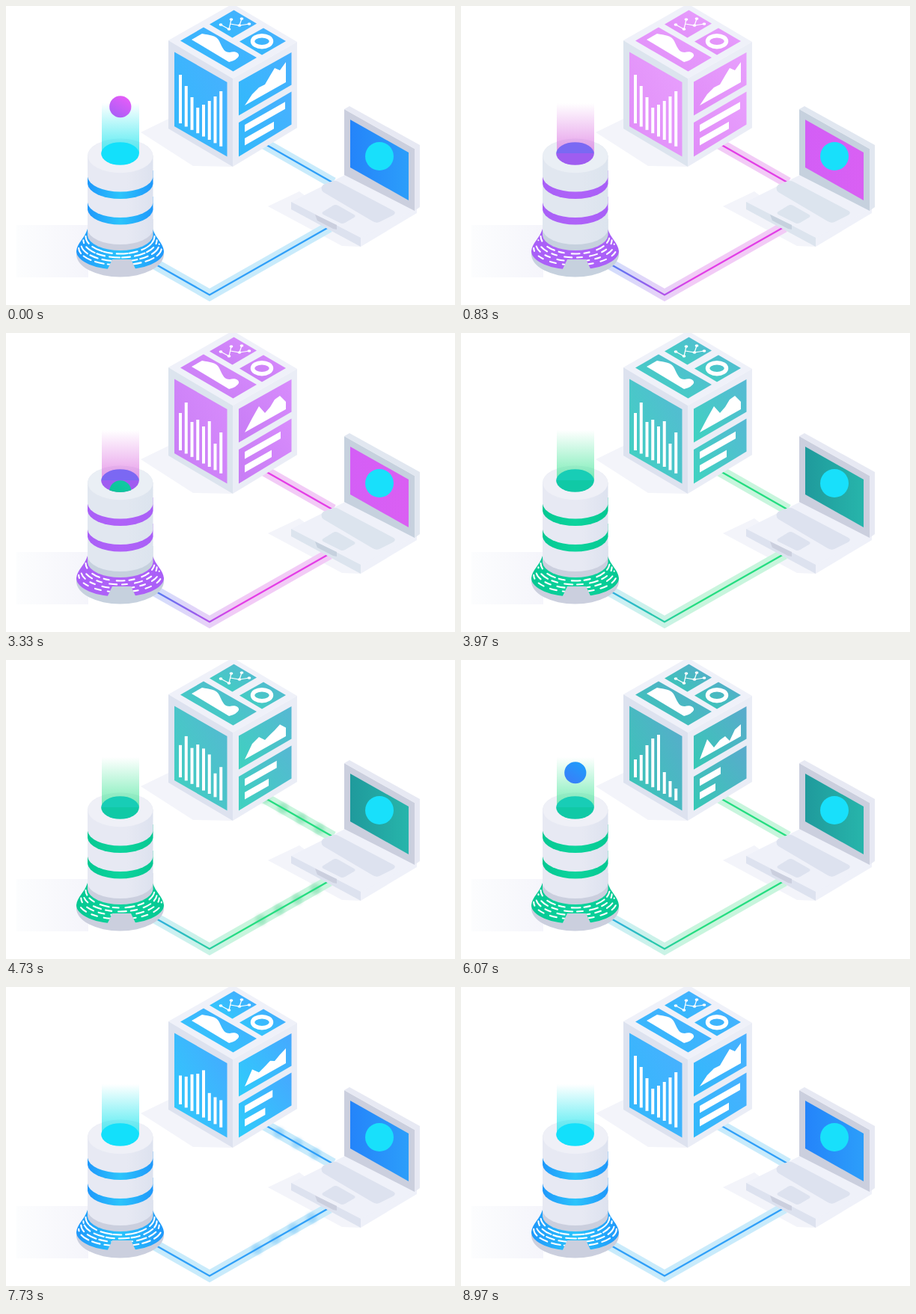
Animation, 600 px wide and 400 px high, one loop 9.01 s. Source, as an HTML page:

```html
<!DOCTYPE html>
<html lang="en">
<head>
<meta charset="utf-8">
<title>Data flow</title>
<style>
html, body { margin: 0; width: 100%; height: 100%; overflow: hidden; background: #fff; }
svg { display: block; width: 600px; height: 400px; }
.white { fill: #fff; }
.pale { fill: #eff1f9; }
.light { fill: var(--light); }
.mid { fill: var(--mid); }
.dark { fill: var(--dark); }
.panel { fill: url(#panel); }
.line { fill: none; stroke: #fff; }
.band { fill: none; stroke: url(#bandFill); stroke-width: 15; }
.wire { fill: none; stroke: url(#wireFill); stroke-width: 2.3; }
</style>
</head>
<body>
<svg id="stage" viewBox="0 0 600 400">
  <defs>
    <linearGradient id="panel" x1="0" y1="1" x2="1" y2="0">
      <stop offset="0" stop-color="var(--cube0)"/><stop offset="1" stop-color="var(--cube1)"/>
    </linearGradient>
    <linearGradient id="screen">
      <stop offset="0" stop-color="var(--screen0)"/><stop offset="1" stop-color="var(--screen1)"/>
    </linearGradient>
    <linearGradient id="ring">
      <stop offset="0" stop-color="var(--ring0)"/><stop offset=".5" stop-color="var(--ring1)"/><stop offset="1" stop-color="var(--ring0)"/>
    </linearGradient>
    <linearGradient id="beam" x1="0" y1="0" x2="0" y2="1">
      <stop offset="0" stop-color="var(--beam)" stop-opacity="0"/><stop offset="1" stop-color="var(--beam)" stop-opacity=".8"/>
    </linearGradient>
    <linearGradient id="hole" x1="0" y1="0" x2="0" y2="1">
      <stop offset=".48" stop-color="var(--hole0)"/><stop offset=".48" stop-color="var(--hole1)"/>
    </linearGradient>
    <linearGradient id="ballFill" x1=".2" y1="1" x2=".8" y2="0">
      <stop offset="0" stop-color="var(--ball0)"/><stop offset="1" stop-color="var(--ball1)"/>
    </linearGradient>
    <linearGradient id="body">
      <stop offset="0" stop-color="var(--light)"/><stop offset=".6" stop-color="var(--light)"/><stop offset="1" stop-color="var(--mid)"/>
    </linearGradient>
    <linearGradient id="wireFill" gradientUnits="userSpaceOnUse" x1="205" x2="310" y1="0" y2="0">
      <stop offset="0" stop-color="var(--wire0)"/><stop offset="1" stop-color="var(--wire1)"/>
    </linearGradient>
    <linearGradient id="bandFill" gradientUnits="userSpaceOnUse" x1="205" x2="310" y1="0" y2="0">
      <stop offset="0" stop-color="var(--band0)"/><stop offset="1" stop-color="var(--band1)"/>
    </linearGradient>
    <linearGradient id="shade">
      <stop offset="0" stop-color="#fcfdfe"/><stop offset="1" stop-color="#f5f5fb"/>
    </linearGradient>
    <clipPath id="shaft"><path d="M120 0H186V197.5H178A25.5 15.5 0 0 1 127 197.5H120Z"/></clipPath>
    <clipPath id="collarClip"><path d="M92 290H213V362H178L167 339H142L131 362H92Z"/></clipPath>
    <filter id="soft" x="-50%" y="-50%" width="200%" height="200%"><feGaussianBlur stdDeviation="2"/></filter>
  </defs>

  <!-- shadows -->
  <path fill="url(#shade)" d="M14 293H110V363H14Z"/>
  <path fill="#f3f4fa" d="M180 169L217 151L303 215L250 214ZM350 268L392 248L474 310V322L449 321Z"/>

  <!-- cables -->
  <path class="band" d="M432 295.5L272 386.5L198 344.5"/>
  <path class="band" d="M437 236.5L344 183.5"/>
  <g id="pulses" fill="var(--pulse)" filter="url(#soft)"></g>
  <path id="towerCable" class="wire" d="M432 295.5L272 386.5L198 344.5"/>
  <path id="cubeCable" class="wire" d="M437 236.5L344 183.5"/>

  <!-- cube -->
  <path class="pale" d="M303 -3L389 48L303 97L217 46Z"/>
  <path class="mid" d="M217 46L303 97V215L217 164Z"/>
  <path fill="#eaedf6" d="M389 48L303 97V215L389 163Z"/>
  <path class="panel" d="M225 61.5L295.5 102V201.5L225 161Z"/>
  <path class="panel" d="M311 101.5L381.5 62V105.5L311 146.5Z"/>
  <path class="panel" d="M311 156L381.5 114.5V158.5L311 201.5Z"/>
  <path class="panel" d="M272 24.5L304.5 5.5L335 23.5L302.5 42.5Z"/>
  <path class="panel" d="M312 47.5L344 29.5L374 47L342 65.5Z"/>
  <path class="panel" d="M233 46.5L264 28.5L335 69L303.5 87.5Z"/>
  <path class="white" d="M248 45L262 37C272 39 281 39 285 47C290 58 292 62 299 62C305 60 312 62 311 67Q309 72 298 75Z"/>
  <ellipse class="line" stroke-width="5.5" cx="342" cy="47.2" rx="12.5" ry="7.5"/>
  <path class="line" stroke-width="1.2" d="M287 25L298 31L301 18M300 24L312 26L315 17M312 26L325 24"/>
  <g id="nodes" class="white"></g>
  <g id="bars" class="line" stroke-width="4"></g>
  <path id="area" class="white"/>
  <path id="rows" class="white"/>

  <!-- laptop -->
  <path class="pale" d="M381 262L453 226L548 273L474 312Z"/>
  <path class="mid" d="M381 262L474 310V322L381 272Z"/>
  <path class="pale" d="M474 310L549 271V277L474 322Z"/>
  <path class="dark" d="M413 279L442 293V299L437 298L416 287Z"/>
  <path class="mid" d="M424 239L437 234Q441 233 446 236L518 274Q522 277 517 280L499 289Q495 291 490 288L424 249Q419 244 424 239Z"/>
  <path class="mid" d="M424 275L437 267Q440 265 444 267L465 279Q468 281 465 283L453 290Q449 292 446 290L424 279Q421 277 424 275Z"/>
  <path class="dark" d="M452 138L546 191V274L452 226Z"/>
  <path class="light" d="M452 138L459 134L553 186L546 191ZM546 191L553 186V269L546 274Z"/>
  <path fill="url(#screen)" d="M460 152L538 196V260L460 216Z"/>
  <circle cx="499" cy="201" r="19" fill="#18e0fb"/>

  <!-- tower -->
  <ellipse class="dark" cx="152.5" cy="332" rx="58.5" ry="30.5"/>
  <g clip-path="url(#collarClip)">
    <path fill="url(#ring)" d="M109 298C105 311 95 317 94 328A58.5 25 0 0 0 211 328C210 317 200 311 196 298Z"/>
    <g id="lights" class="line" stroke-width="2.1" stroke-linecap="round"></g>
  </g>
  <path class="dark" d="M109 285V307A43.8 21 0 0 0 196.5 307V285Z"/>
  <path fill="url(#body)" d="M109 270V299A43.8 21 0 0 0 196.5 299V270Z"/>
  <path fill="url(#ring)" d="M109 255V272.5A43.8 21 0 0 0 196.5 272.5V255Z"/>
  <path fill="url(#body)" d="M109 230V263A43.8 21 0 0 0 196.5 263V230Z"/>
  <path fill="url(#ring)" d="M109 220V238A43.8 21 0 0 0 196.5 238V220Z"/>
  <path fill="url(#body)" d="M109 200V228.5A43.8 21 0 0 0 196.5 228.5V200Z"/>
  <ellipse class="light" cx="152.7" cy="200.5" rx="43.8" ry="23"/>
  <ellipse cx="152.7" cy="200.5" rx="43.5" ry="22.7" fill="#fff" opacity=".3"/>
  <path fill="url(#beam)" d="M128 130H178V197H128Z"/>
  <ellipse fill="url(#hole)" cx="152.5" cy="197.5" rx="25.3" ry="15.3"/>
  <circle id="ball" cx="152.8" r="14.6" fill="url(#ballFill)" clip-path="url(#shaft)"/>
</svg>

<script>
const LOOP = 9010;
const STARTS = [0, 3040, 6010];
const BALL_SPEED = 0.266, PULSE_SPEED = 0.2, PULSE_GAP = 28;

const pink = {
  cube0: "#e18cf8", cube1: "#e9a0fd", late0: "#c77cf5", late1: "#d88cfc",
  screen0: "#d45ef6", screen1: "#da5ff3", ring0: "#a95ff7", ring1: "#b062f8",
  beam: "#e07fe4", hole0: "#7b68f3", hole1: "#a05cf0", wire0: "#5b78f2", wire1: "#e43de6",
  band0: "#d4dcfb", band1: "#f2cbf6", pulse: "#e68be2",
  light: "#e1e7f0", mid: "#dce4ee", dark: "#c6d1de", dash: 9
};
const green = {
  cube0: "#3fd3c0", cube1: "#56b9d4", late0: "#36c9b5", late1: "#5aaacd",
  screen0: "#1f9a9c", screen1: "#27b5ab", ring0: "#05c892", ring1: "#0dd49d",
  beam: "#55e8a2", hole0: "#18cdb6", hole1: "#10c9a6", wire0: "#2fb0dc", wire1: "#24dd80",
  band0: "#cdeff5", band1: "#c8f5dd", pulse: "#8be0b5",
  light: "#e7e9f3", mid: "#dde2ef", dark: "#cbcfde", dash: 10
};
const blue = {
  cube0: "#2dd0fb", cube1: "#45a7ff", late0: "#31b9fb", late1: "#49b0ff",
  screen0: "#2484fa", screen1: "#2c9efa", ring0: "#1f98fb", ring1: "#2cc4fb",
  beam: "#22e6ee", hole0: "#13e0fb", hole1: "#13e0fb", wire0: "#2f9ff8", wire1: "#2f9ff8",
  band0: "#c9ebfb", band1: "#c9ebfb", pulse: "#8dcff8",
  light: "#e7e9f3", mid: "#dde2ef", dark: "#cbcfde", dash: 13
};
const themes = [pink, green, blue];
const ballColors = [["#a65ff6", "#e95cf8"], ["#0cc392", "#10c9a4"], ["#3a7df8", "#1e9dfb"]];

// Chart shapes in the order they appear.
const charts = [
  { bars: [92, 107, 122, 136, 132, 127, 121, 114], area: [118, 109, 105, 93, 83, 86, 75], rows: [373, 358] },
  { bars: [107, 93, 119, 116, 125, 118, 148, 133], area: [114, 98, 107, 99, 89, 84, 92], rows: [367, 355] },
  { bars: [133, 127, 114, 105, 100, 150, 162, 172], area: [106, 117, 107, 102, 108, 93, 86], rows: [347, 340] }
];
const AREA_X = [329, 338, 346, 353, 359, 366, 374];

const $ = id => document.getElementById(id);
const stage = $("stage");
const lerp = (a, b, p) => a + (b - a) * p;
const lerpAll = (a, b, p) => a.map((v, i) => lerp(v, b[i], p));
const ramp = (t, from, to) => {
  const p = Math.min(1, Math.max(0, (t - from) / (to - from)));
  return p * p * (3 - 2 * p);
};

function mix(a, b, p) {
  const channel = (hex, i) => parseInt(hex.slice(i, i + 2), 16);
  return `rgb(${[1, 3, 5].map(i => Math.round(lerp(channel(a, i), channel(b, i), p)))})`;
}

function add(parent, tag, attrs = {}) {
  const el = document.createElementNS("http://www.w3.org/2000/svg", tag);
  for (const key in attrs) el.setAttribute(key, attrs[key]);
  return parent.appendChild(el);
}

[[287, 25], [298, 31], [301, 18], [312, 26], [325, 24], [315, 17]].forEach(([cx, cy]) =>
  add($("nodes"), "ellipse", { cx, cy, rx: 2.4, ry: 1.8 }));

const bars = charts[0].bars.map((_, i) => {
  const x = 233 + 7.75 * i;
  return add($("bars"), "line", { x1: x, x2: x, y2: 157 + 4.4 * i });
});

const lights = [0, 1, 2, 3].map(i => {
  const rx = 46 + 3.1 * i, y = 308 + 5.3 * i;
  return add($("lights"), "path", { d: `M${152.5 - rx} ${y}A${rx} ${23.5 - 0.3 * i} 0 0 0 ${152.5 + rx} ${y}` });
});

const pulses = [["towerCable", 13], ["cubeCable", 13]].flatMap(([id, count]) =>
  Array.from({ length: count }, (_, i) => ({
    path: $(id), length: $(id).getTotalLength(), delay: i * PULSE_GAP,
    el: add($("pulses"), "circle", { r: 7 })
  })));

function paint(from, to, fade, settle) {
  for (const key in to) {
    if (key === "dash" || key.startsWith("late")) continue;
    const late = key.replace("cube", "late");
    const settling = key !== late && settle > 0;
    stage.style.setProperty("--" + key, settling ? mix(to[key], to[late], settle) : mix(from[late], to[key], fade));
  }
}

function drawCharts(from, to, p) {
  lerpAll(from.bars, to.bars, p).forEach((y, i) => bars[i].setAttribute("y1", y));
  const ridge = lerpAll(from.area, to.area, p).map((y, i) => `L${AREA_X[i]} ${y}`).join("");
  $("area").setAttribute("d", `M319 133${ridge}V102Z`);
  $("rows").setAttribute("d", lerpAll(from.rows, to.rows, p).map((x, i) => {
    const y = 159 + 18 * i, rise = 0.57 * (x - 319);
    return `M319 ${y}L${x} ${y - rise}v9.5L319 ${y + 9.5}Z`;
  }).join(""));
}

function drawPulses(phase) {
  const head = (phase - 1165) * PULSE_SPEED;
  $("pulses").setAttribute("opacity", 0.7 * (1 - ramp(phase, 2400, 2930)));
  for (const { path, length, delay, el } of pulses) {
    const s = head - delay;
    const shown = s > 0 && s < length;
    el.setAttribute("visibility", shown ? "visible" : "hidden");
    if (!shown) continue;
    const { x, y } = path.getPointAtLength(s);
    el.setAttribute("cx", x);
    el.setAttribute("cy", y);
  }
}

function drawLights(dash, phase) {
  const travel = 36 * ramp(phase, 900, 2950);
  lights.forEach((el, i) => {
    el.setAttribute("stroke-dasharray", `${dash - 2} ${19 - dash} ${dash + 2 - i} ${15 - dash + i}`);
    el.setAttribute("stroke-dashoffset", 7 * i - travel);
  });
}

function draw(t) {
  const i = t >= STARTS[2] ? 2 : t >= STARTS[1] ? 1 : 0;
  const phase = t - STARTS[i], before = (i + 2) % 3, after = (i + 1) % 3;
  const fade = ramp(phase, 500, 850);
  paint(themes[before], themes[i], fade, ramp(phase, 1500, 2400));
  drawCharts(charts[i], charts[after], ramp(phase, 1540, 1990));
  drawPulses(phase);
  drawLights(lerp(themes[before].dash, themes[i].dash, fade), phase);
  stage.style.setProperty("--ball0", ballColors[i][0]);
  stage.style.setProperty("--ball1", ballColors[i][1]);
  $("ball").setAttribute("cy", 134.5 + BALL_SPEED * Math.min(phase, 400));
}

const begin = performance.now();
function tick() {
  draw((performance.now() - begin) % LOOP);
  requestAnimationFrame(tick);
}
tick();
</script>
</body>
</html>
```
